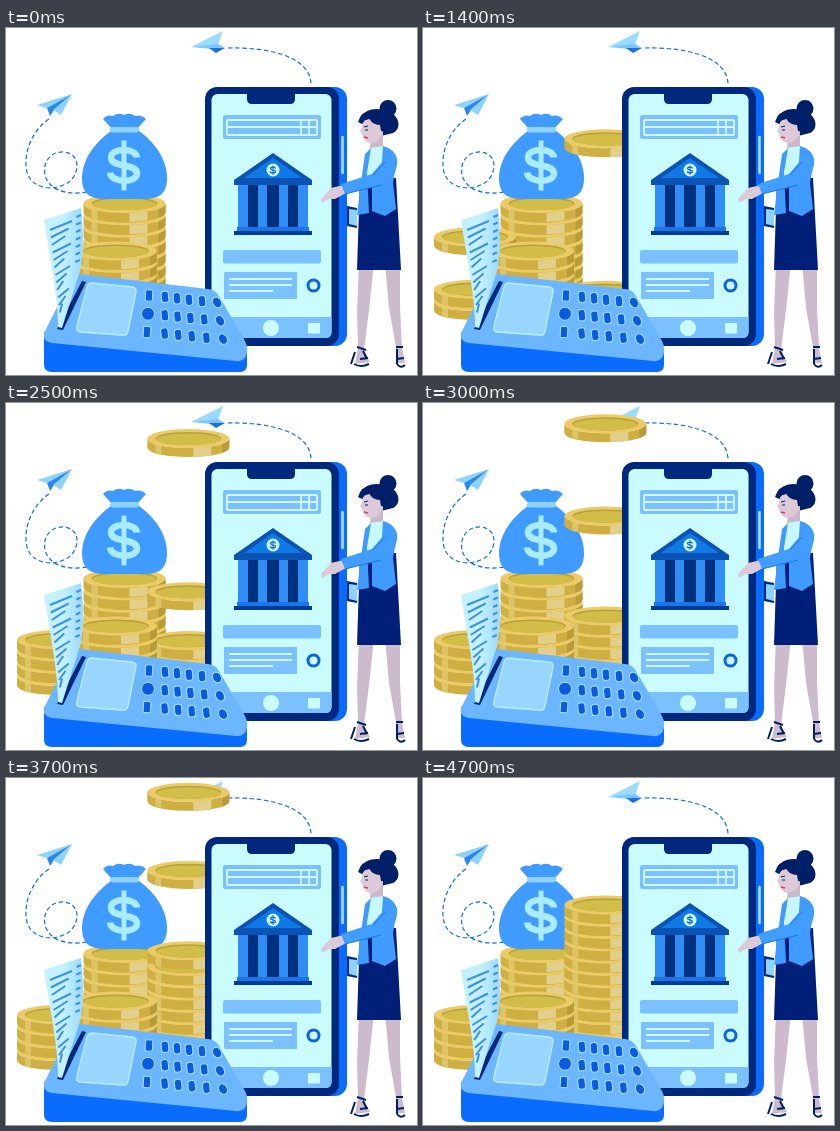
Animation of 411 by 347 pixels, one loop 9700 ms. Source, as an HTML page:

```html
<!DOCTYPE html>
<html lang="en">
<head>
<meta charset="utf-8">
<title>Growing savings</title>
<style>
  html, body { margin: 0; width: 100%; height: 100%; overflow: hidden; background: #fff; }
  svg { display: block; width: 100%; height: 100%; }
</style>
</head>
<body>
<svg viewBox="0 0 411 347">
  <defs>
    <g id="coin"></g>
    <g id="dollar" fill="none">
      <path d="M13 -8C12 -18 -13 -18 -13 -8C-13 3 13 -3 13 8C13 18 -13 18 -14 7" stroke-width="6.5"/>
      <path d="M0 -25V25" stroke-width="5"/>
    </g>
    <linearGradient id="paper"><stop offset=".5" stop-color="#c3f1ff"/><stop offset="1" stop-color="#9ad9ff"/></linearGradient>
  </defs>

  <!-- paper planes -->
  <g fill="none" stroke="#0a6cff" stroke-width="1.2" stroke-dasharray="4.5 2.7">
    <path d="M43 91C24 104 17 128 21 144C26 161 46 163 60 156C74 148 76 126 58 124C43 123 35 137 40 150C46 164 64 167 82 164"/>
    <path d="M222 20C256 19 304 26 305 56"/>
  </g>
  <path d="M66 66L31 77L41 80Z" fill="#8ed3ff"/>
  <path d="M66 66L41 80L44 88L48 82Z" fill="#2b86f0"/>
  <path d="M66 66L47 82L55 87Z" fill="#8ed3ff"/>
  <path d="M185 19L217 3L212 17Z" fill="#9adbff"/>
  <path d="M185 19L212 16L219 20L206 21Z" fill="#7cc6ff"/>
  <path d="M203 20L219 20L210 25Z" fill="#1a70e4"/>

  <g id="backStack"></g>

  <!-- money bag -->
  <path d="M105 103C91 113 76 130 76 150C76 166 84 171 100 171H138C154 171 161 165 161 150C161 130 147 113 133 103Z" fill="#3f9bff"/>
  <path d="M106 101L97 91Q101 86 107 88Q112 84 118 87Q124 84 129 88Q135 86 140 91L131 101Z" fill="#3f9bff"/>
  <rect x="104" y="99" width="29" height="5.5" rx="2.700" fill="#8ed3ff"/>
  <use href="#dollar" x="118" y="137.500" stroke="#a9ebff"/>

  <g id="falling"></g>
  <g id="frontStack"></g>

  <!-- phone -->
  <rect x="208" y="59" width="133" height="259" rx="12" fill="#0a6cff"/>
  <rect x="199" y="59" width="134" height="259" rx="12" fill="#00287c"/>
  <rect x="205.500" y="66" width="120" height="244" rx="6" fill="#c9fbff"/>
  <path d="M241 65H289V71Q289 76 284 76H246Q241 76 241 71Z" fill="#00287c"/>
  <path d="M336.500 109V145" stroke="#a9e5ff" stroke-width="2.500" stroke-linecap="round"/>
  <g fill="#7bc0ff">
    <rect x="217" y="87" width="98" height="24" rx="2"/>
    <rect x="217" y="222" width="98" height="13.500" rx="2"/>
    <rect x="218" y="244" width="73" height="27" rx="1"/>
    <path d="M205.500 289H325.500V304Q325.500 310 319.500 310H205.500Z"/>
  </g>
  <g fill="none" stroke="#d0f8ff" stroke-width="1.800">
    <path d="M221 92H311M221 99H311M221 107H311M221 92V107M295 92V107M303 92V107M311 92V107"/>
    <path d="M223 251H286M223 257H286M223 263H267"/>
  </g>
  <circle cx="307.500" cy="257.500" r="5.500" fill="#c9fbff" stroke="#0a62e8" stroke-width="3"/>
  <circle cx="265" cy="300" r="8" fill="#c9fbff"/>
  <rect x="302" y="295" width="12" height="10.500" rx="1" fill="#c9fbff"/>

  <!-- bank -->
  <rect x="236" y="155" width="62" height="45" fill="#00317f"/>
  <path d="M228 152L267 125L306 152V157H228Z" fill="#0a52b4"/>
  <path d="M238 150L267 130L296 150Z" fill="#0f7ae6"/>
  <circle cx="267" cy="142" r="6.500" fill="#c9fbff"/>
  <use href="#dollar" transform="translate(267 142) scale(.19)" stroke="#0d5fc9"/>
  <path d="M232 157H242V200H232ZM252 157H261V200H252ZM273 157H282V200H273ZM292 157H302V200H292Z" fill="#2f8df5"/>
  <path d="M231 199H303V203H231Z" fill="#1976e5"/>
  <path d="M228 203H306V207H228Z" fill="#003b9c"/>

  <!-- woman -->
  <g>
    <path d="M353 235H368L363 282L358 322L364 334L349 336L352 320L351 284ZM379 235H394L394 279L396 320L399 335H391L390 319L383 280Z" fill="#cbbbcd"/>
    <path d="M351 319L360 322M349 324L345 336M348 336Q355 340 363 336M354 331L362 330M357 323L361 331M390 319H397M391 336Q395 341 399 337M391 331L398 330M391 321V336" fill="none" stroke="#001f69" stroke-width="2"/>
    <path d="M341 178L351 180V200L341 198Z" fill="#00287c"/>
    <path d="M343 181L351 182V198L343 196Z" fill="#8ed3ff"/>
    <path d="M354 150H390L395 242H351Z" fill="#001f78"/>
    <circle cx="382" cy="80.500" r="8.500" fill="#001f69"/>
    <path d="M354 94C355 82 369 78 381 83C394 87 396 101 387 105L375 108Z" fill="#001f69"/>
    <path d="M366 106L377 102L377 119L369 127L364 119Z" fill="#cbb8ca"/>
    <path d="M357 92Q365 92 370 87Q378 93 377 103Q374 115 364 115Q358 114 356 106L354 103L356 100Z" fill="#dccad8"/>
    <path d="M352 94Q355 83 367 82L384 88L381 104L375 103L374 97Q366 97 363 90Q358 92 356 96Z" fill="#001f69"/>
    <path d="M358 99L362 98M359 102H362" stroke="#001f69"/>
    <path d="M358 109L362 110" stroke="#e23a60" stroke-width="1.500"/>
    <path d="M364 120L378 118L379 152H361Z" fill="#c7f7ff"/>
    <path d="M377 118Q388 120 391 132L387 155L390 181L379 188L366 183L366 158L375 148Z" fill="#3f9bff"/>
    <path d="M365 120L361 145L363 185L351 187L355 154L359 126Z" fill="#3f9bff"/>
    <path d="M338 157L325 160L315 171L316 175L323 171L329 171L340 165Z" fill="#dccad8"/>
    <path d="M384 122Q393 127 391 137Q389 151 376 157L339 166L335 156L366 146L378 132Z" fill="#419dff"/>
    <path d="M367 147L379 134M375 157L339 166" fill="none" stroke="#1976e5"/>
  </g>

  <!-- card terminal -->
  <path d="M38 304L241 320V337Q241 344 234 344H46Q38 344 38 337Z" fill="#0a6cff"/>
  <path d="M67 247Q69 245 74 246L202 261Q210 262 213 268L239 313Q243 321 240 328Q237 334 230 333L46 315Q36 313 38 305Z" fill="#6cb6ff"/>
  <path d="M86 255L126 259Q131 260 130 264L122 303Q121 308 116 307L74 304Q69 303 71 298L81 259Q82 255 86 255Z" fill="#99d6ff" stroke="#b8eeff" stroke-width="1.300"/>
  <g id="keys" fill="#0a5be0" stroke="#a9e2ff"></g>
  <path d="M51 301L76 253L80 254L57 302Z" fill="#00287c"/>
  <path d="M38 192L75 180Q79 211 75 240L56 300L52 299Q52 274 45 235Z" fill="url(#paper)"/>
  <path id="print" fill="none" stroke="#3a90f0" stroke-width="2"/>
</svg>
<script>
const LOOP = 9700, STEP = 100, FALL = 600;
const COIN_RX = 41, COIN_RY = 9.5, COIN_RIM = 9;
const COIN_HEIGHT = 2 * COIN_RY + COIN_RIM, COIN_PITCH = 12.3;
const byId = id => document.getElementById(id);

// A band on the rim between two horizontal offsets.
function rimBand(x1, x2, color) {
  const y = x => COIN_RY * (1 + Math.sqrt(1 - (x / COIN_RX) ** 2));
  const arc = `A${COIN_RX} ${COIN_RY} 0 0`;
  return `<path d="M${x1} ${y(x1)}${arc} 0 ${x2} ${y(x2)}v${COIN_RIM}` +
    `${arc} 1 ${x1} ${y(x1) + COIN_RIM}z" fill="${color}"/>`;
}

byId('coin').innerHTML =
  rimBand(-41, 41, '#cfae42') +
  rimBand(-33, -27, '#dcc469') +
  rimBand(5, 23, '#e2d08a') +
  rimBand(34, 41, '#b99b38') +
  `<ellipse cy="${COIN_RY}" rx="${COIN_RX}" ry="${COIN_RY}" fill="#ebcb68"/>` +
  `<ellipse cy="${COIN_RY}" rx="33" ry="6.6" fill="#b8a03a"/>` +
  `<ellipse cy="${COIN_RY + .8}" rx="32" ry="5.8" fill="#d2bd48"/>`;

function addCoin(parent, x, y) {
  const coin = document.createElementNS('http://www.w3.org/2000/svg', 'use');
  coin.setAttribute('href', '#coin');
  coin.setAttribute('x', x);
  coin.setAttribute('y', y);
  parent.append(coin);
  return coin;
}

function addStack(id, x, top, count) {
  for (let i = count - 1; i >= 0; i--) addCoin(byId(id), x, top + i * COIN_PITCH);
}
addStack('backStack', 118.5, 166, 7);
addStack('frontStack', 110, 213.5, 4);

const columns = [
  { x: 52, floor: 264, starts: [50, 292, 890, 1860] },
  { x: 182.3, floor: 252.7, starts: [432, 1111, 1591, 1990, 2360, 2640, 2886, 3110, 3335, 3584, 3834, 4090] }
];
const coins = columns.flatMap(({ x, floor, starts }) => starts.map((start, i) => ({
  start,
  rest: floor - i * COIN_PITCH,
  node: addCoin(byId('falling'), x, -COIN_HEIGHT)
})));

// Keypad rows spread slightly towards the viewer.
const keyColumns = [143, 159, 171, 183, 196, 211];
let keys = '';
for (let row = 0; row < 3; row++) {
  keyColumns.forEach((column, col) => {
    const x = column + row * (col * .8 - 1);
    const y = 267.5 + row * 18.3 + col * 1.4;
    const shape = col === 5
      ? '<ellipse rx="4.3" ry="5.6" transform="rotate(-28)"/>'
      : col === 0 && row === 1
        ? '<circle r="6.5"/>'
        : `<rect x="-3.6" y="-5.6" width="7.2" height="11.2" rx="${col ? 2.5 : 1}" transform="rotate(${col ? -6 : 4})"/>`;
    keys += `<g transform="translate(${x} ${y})">${shape}</g>`;
  });
}
byId('keys').innerHTML = keys;

let print = '';
for (let i = 0; i < 12; i++) {
  const y = 202 + i * 7.5, left = 44 + i * .9, right = 66 - i * .35;
  print += `M${left} ${y}L${right - (i % 3) * 3} ${y - 9}`;
  if (i < 7) print += `M${70.500 - i * .2} ${y - 13}l4.5 -2`;
}
byId('print').setAttribute('d', print);

function draw(now) {
  const time = Math.floor(now % LOOP / STEP) * STEP;
  for (const { start, rest, node } of coins) {
    const progress = Math.min(1, Math.max(0, (time - start) / FALL));
    node.setAttribute('y', -COIN_HEIGHT + (rest + COIN_HEIGHT) * progress);
  }
  requestAnimationFrame(() => draw(performance.now()));
}
draw(performance.now());
</script>
</body>
</html>
```
